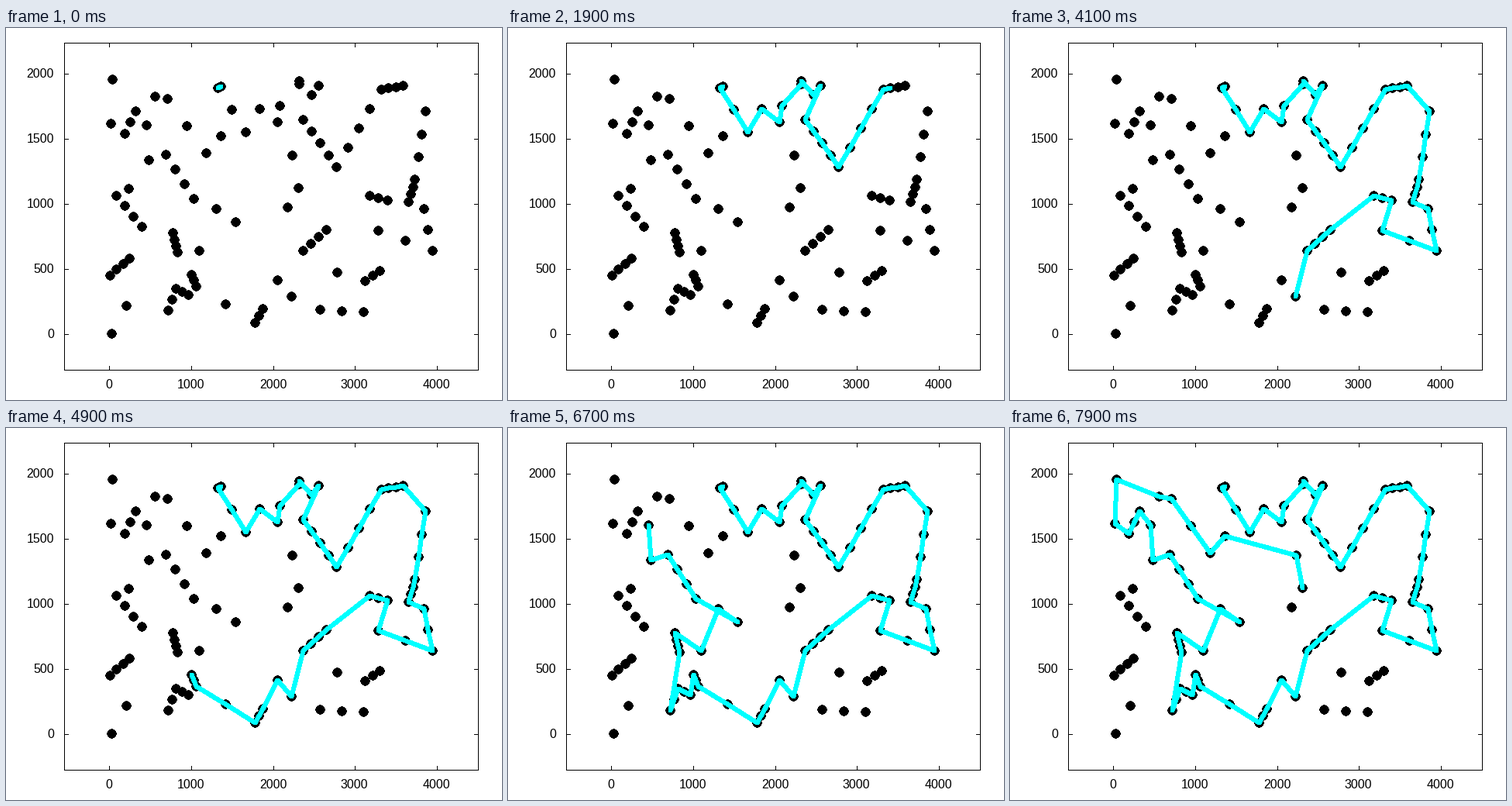
These frames come from a looping animation (640x480 px, 8000 ms). A matplotlib script:

```python
import numpy as np
import matplotlib.pyplot as plt
from matplotlib.animation import FuncAnimation
from matplotlib.collections import PatchCollection
from matplotlib.patches import Circle

W, H, DPI = 640, 480, 100
FRAMES, INTERVAL = 80, 100
PT = 72 / DPI  # one pixel in points
LEFT, RIGHT, TOP, BOTTOM = 75.5, 609.5, 19.5, 441.5
TICK = 5

plt.rcParams["path.simplify"] = False
plt.rcParams["font.family"] = "Liberation Sans"

# Key corners (x, y[, steps]); a leg of several steps has evenly spaced stops.
TOUR = [
    (1357, 1905), (1327, 1893), (1660, 1556, 2), (1838, 1732), (2048, 1628),
    (2082, 1753), (2318, 1925), (2312, 1949), (2469, 1838), (2552, 1909),
    (2365, 1649), (2773, 1286, 4), (3314, 1881, 4), (3586, 1909, 3),
    (3853, 1712), (3729, 1188, 3), (3646, 1018, 3), (3835, 963),
    (3939, 640, 2), (3278, 799, 2), (3394, 1028), (3174, 1064, 2),
    (2650, 802), (2361, 640, 3), (2221, 291), (2049, 417), (1868, 197),
    (1779, 90, 2), (1058, 372, 2), (1000, 457, 2), (960, 303),
    (812, 351, 2), (721, 186, 2), (834, 629), (779, 777, 3), (1097, 643),
    (1307, 964), (1544, 863), (1027, 1041), (693, 1383, 3), (482, 1337),
    (457, 1607), (323, 1714), (185, 1542, 2), (22, 1617), (43, 1957),
    (554, 1825), (705, 1812), (1183, 1391, 2), (1362, 1526),
    (2232, 1374), (2302, 1127),
]
UNSEEN = [
    (2178, 978), (2781, 478), (3297, 491), (3124, 408, 2), (3099, 173),
    (2576, 189, 2), (234, 1118), (86, 1065), (396, 828, 3), (242, 584),
    (14, 454, 3), (213, 220), (29, 6),
]


def px(x):
    return np.rint(132.95 + 0.1058 * np.asarray(x)) + 0.5


def py(y):
    return np.rint(395 - 0.168 * np.asarray(y)) + 0.5


def stops(corners):
    """All stops along the corners, in pixels."""
    pts = [np.array(corners[0][:2], float)]
    for x, y, *steps in corners[1:]:
        n = steps[0] if steps else 1
        pts.extend(np.linspace(pts[-1], (x, y), n + 1)[1:])
    xs, ys = np.transpose(pts)
    return np.column_stack([px(xs), py(ys)])


route = stops(TOUR)
spots = np.vstack([route, stops(UNSEEN)])

fig = plt.figure(figsize=(W / DPI, H / DPI), dpi=DPI, facecolor="white")
ax = fig.add_axes([0, 0, 1, 1])
ax.set_xlim(0, W)
ax.set_ylim(H, 0)
ax.axis("off")


def hair(x0, y0, x1, y1):
    ax.plot([x0, x1], [y0, y1], color="black", lw=PT, aa=False, snap=False,
            solid_capstyle="projecting", zorder=3)


def label(x, y, value, ha):
    ax.text(x, y, str(value), ha=ha, va="baseline", fontsize=16 * PT)


for y in (TOP, BOTTOM):
    hair(LEFT, y, RIGHT, y)
for x in (LEFT, RIGHT):
    hair(x, TOP, x, BOTTOM)

for v in range(0, 4001, 1000):
    x = px(v)
    hair(x, BOTTOM, x, BOTTOM - TICK)
    hair(x, TOP, x, TOP + TICK)
    label(x - 1, 465, v, "center")

for v in range(0, 2001, 500):
    y = py(v)
    hair(LEFT, y, LEFT + TICK, y)
    hair(RIGHT, y, RIGHT - TICK, y)
    label(62, y + 4.5, v, "right")

ax.add_collection(PatchCollection([Circle(p, 5.6) for p in spots],
                                  facecolor="black", linewidth=0,
                                  antialiased=False, zorder=4))
trail, = ax.plot([], [], color="cyan", lw=5 * PT, aa=False, snap=False,
                 solid_capstyle="round", solid_joinstyle="round", zorder=5)


def update(n):
    trail.set_data(*route[:n + 2].T)
    return trail,


anim = FuncAnimation(fig, update, frames=FRAMES, interval=INTERVAL,
                     init_func=lambda: update(0), repeat=True,
                     repeat_delay=0, blit=False)
plt.show()
```
